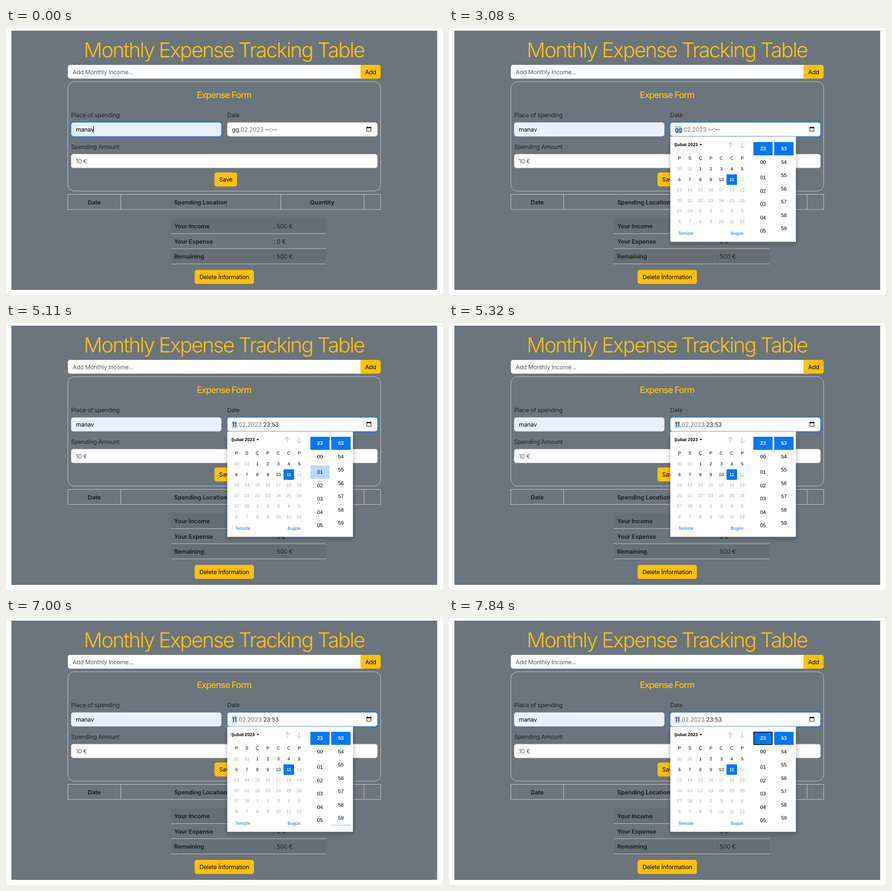
An HTML page for the animation above (8 s loop, 936x572 px).

```html
<!DOCTYPE html>
<html lang="en">
<head>
<meta charset="utf-8">
<title>Monthly Expense Tracking Table</title>
<style>
  html, body { margin: 0; width: 100%; height: 100%; overflow: hidden; background: #fff; }
  svg { display: block; }
  text { white-space: pre; font-optical-sizing: none; text-rendering: geometricPrecision; }
  .ui { font: 12.65px Inter, "Open Sans", sans-serif; letter-spacing: -.0175em; }
  .bold { font-weight: 700; letter-spacing: -.008em; }
  .title { font-size: 44.3px; font-weight: 300; letter-spacing: -.052em; }
  .sub { font-size: 19px; font-weight: 500; letter-spacing: -.055em; }
  .cal { font: 9.5px "Liberation Sans", Arial, sans-serif; }
  .time { font-size: 11px; }
  .strong { font-weight: 700; }
</style>
</head>
<body>
<svg id="stage" width="936" height="572" viewBox="0 0 936 572">
  <defs>
    <clipPath id="list"><rect x="640" y="243.7" width="102" height="201.3"/></clipPath>
    <filter id="soft" x="-10%" y="-10%" width="120%" height="120%"><feGaussianBlur stdDeviation="2"/></filter>
  </defs>
</svg>
<script>
const stage = document.getElementById('stage');
const INK = '#212529', GOLD = '#ffc107', BLUE = '#0075ff', HINT = '#595c5f', LINE = '#c6cacd';

function add(tag, attrs, parent = stage) {
  const node = document.createElementNS('http://www.w3.org/2000/svg', tag);
  for (const key in attrs) node.setAttribute(key, attrs[key]);
  parent.append(node);
  return node;
}
const group = (parent, attrs = {}) => add('g', attrs, parent);
const rect = (x, y, width, height, fill, rx = 0, parent = stage, more = {}) =>
  add('rect', { x, y, width, height, fill, rx, ...more }, parent);
const path = (d, stroke, width = 1, parent = stage) =>
  add('path', { d, stroke, 'stroke-width': width, fill: 'none' }, parent);
function label(str, x, y, cls = 'ui', fill = INK, anchor = 'start', parent = stage) {
  const node = add('text', { x, y, class: cls, fill, 'text-anchor': anchor }, parent);
  node.textContent = str;
  return node;
}
const show = (node, on) => node.setAttribute('visibility', on ? 'visible' : 'hidden');

function field(x, y, w, fill = '#fff') {
  rect(x, y, w, 29.6, fill, 4.7, stage, { stroke: '#ced4da', 'stroke-width': .8 });
}
function focusRing(x, y, w) {
  const g = group(stage);
  rect(x - 1.6, y - 1.6, w + 3.2, 32.8, 'none', 6.3, g,
    { stroke: '#0d6efd', 'stroke-opacity': .34, 'stroke-width': 3.2 });
  rect(x, y, w, 29.6, 'none', 4.7, g, { stroke: '#6ea0ee', 'stroke-width': 1 });
  return g;
}
function button(str, x, y, w) {
  rect(x, y, w, 30, GOLD, 4.7);
  label(str, x + w / 2, y + 19.5, 'ui', '#000', 'middle');
}

// Page
rect(0, 0, 936, 572, '#c4c6c8');
rect(0, 0, 936, 572, '#fff', 4);
rect(0, 5, 936, 1, '#dcdddf');
rect(11.5, 6, 912, 555, '#6c757d');
label('Monthly Expense Tracking Table', 467, 63, 'ui title', GOLD, 'middle');

rect(132.5, 79, 640, 29.5, '#fff', 4.7);
rect(759.5, 79, 43, 29.5, GOLD, 4.7);
rect(759.5, 79, 10, 29.5, GOLD);
label('Add Monthly Income...', 142.7, 98.5, 'ui', HINT);
label('Add', 781, 98.5, 'ui', '#000', 'middle');

// Form
rect(132.5, 115, 670, 234.3, 'none', 14, stage, { stroke: LINE });
label('Expense Form', 467, 150, 'ui sub', GOLD, 'middle');
label('Place of spending', 139.5, 191);
label('Date', 473.8, 191);
label('Spending Amount', 139.5, 259);
field(139.7, 202.4, 321.4, '#e8f0fe');
field(474, 202.4, 321.6);
field(139.7, 270.2, 655.9);
label('manav', 149.8, 222, 'ui', '#000');
label('10 €', 149.6, 290, 'ui', HINT);
const caret = rect(187, 209.5, 1, 15.5, '#000');
const placeRing = focusRing(139.7, 202.4, 321.4);
const dateRing = focusRing(474, 202.4, 321.6);
button('Save', 446.5, 309.5, 48.5);

function dateValue(day, dayWidth, clock, shift) {
  const g = group(stage);
  const mark = rect(483.8, 210, dayWidth, 15.2, '#a9cffc', 0, g);
  label(day, 484, 222, 'ui', INK, 'start', g);
  label('.', 499 - shift, 222, 'ui', INK, 'start', g);
  label('02.2023', 502.3 - shift, 222, 'ui', '#757575', 'start', g);
  label(clock, 554.8 - shift, 222, 'ui', INK, 'start', g);
  return { g, mark };
}
const blank = dateValue('gg', 15.2, '--:--', 0);
const filled = dateValue('11', 11, '23:53', 4);

rect(772.8, 212.5, 9, 8.8, 'none', .8, stage, { stroke: '#111', 'stroke-width': 1.1 });
rect(772.3, 212, 10, 2.7, '#111');
path('M774.6 211v2M780 211v2', '#111', 1.1);

// Expense table
rect(132.5, 356.5, 670, 32.2, 'none', 0, stage, { stroke: LINE });
path('M245.7 356.5v32M588.5 356.5v32M767 356.5v32', LINE);
[['Date', 189], ['Spending Location', 417], ['Quantity', 677.3]].forEach(([str, x]) =>
  label(str, x, 377.6, 'ui bold', INK, 'middle'));

// Totals
[['Your Income', ': 500 €'], ['Your Expense', ': 0 €'], ['Remaining', ': 500 €']].forEach(([name, sum], i) => {
  const y = 408 + i * 32.5;
  if (i !== 1) rect(353.5, y, 332.5, 32.3, 'rgba(0,0,0,.055)');
  path(`M353.5 ${y + 32.4}h332.5`, LINE);
  label(name, 360, y + 21, 'ui bold');
  label(sum, 573, y + 21);
});
button('Delete İnformation', 404, 518.3, 127);

// Date picker
const popup = group(stage);
rect(469, 236, 279.5, 231, 'rgba(0,0,0,.12)', 14, popup, { filter: 'url(#soft)' });
rect(474, 232.6, 269, 225.4, '#fff', 0, popup);
label('Şubat 2023', 482.6, 253.2, 'cal strong', '#000', 'start', popup);
add('path', { d: 'M536.3 248.4h5.8l-2.9 3.2z', fill: '#000' }, popup);
path('M602.3 257v-12.5m-5.5 5.5l5.5-5.5l5.5 5.5M628 244.5v12.5m-5.5-5.5l5.5 5.5l5.5-5.5', '#a8a8a8', .9, popup);

const STEP = 22.42;
const dayX = c => 493.6 + c * STEP;
[...'PSÇPCCP'].forEach((d, c) => label(d, dayX(c), 282.4, 'cal', '#000', 'middle', popup));
rect(594.4, 313.6, 22.6, 22.4, BLUE, 1.5, popup);
for (let i = 0; i < 42; i++) {
  const n = i - 1;
  const day = n < 1 ? n + 31 : n > 28 ? n - 28 : n;
  const chosen = n === 11;
  label(day, dayX(i % 7), 305.4 + Math.floor(i / 7) * STEP, chosen ? 'cal strong' : 'cal',
    chosen ? '#fff' : n > 0 && n < 11 ? '#000' : '#adadad', 'middle', popup);
}
const dayRing = rect(595, 314.2, 21.6, 21.4, 'none', 1.5, popup, { stroke: '#101010', 'stroke-width': 1.6 });
label('Temizle', 491, 442.5, 'cal', BLUE, 'start', popup);
label('Bugün', 630.8, 442.5, 'cal', BLUE, 'end', popup);

const ROW = 28.5;
const columns = [{ x: 652, w: 41, first: 23, wrap: 24 }, { x: 696.6, w: 41.4, first: 53, wrap: 60 }];
const rowTop = (c, i) => 244.2 + i * ROW + (c === 0 && i > 1 ? 5 : 0);
const list = group(group(popup, { 'clip-path': 'url(#list)' }));
const hover = rect(0, 0, 41, ROW, '#bad9ff', 1.5, list);
columns.forEach(({ x, w, first, wrap }, c) => {
  rect(x, rowTop(c, 0), w, ROW, BLUE, 1.5, list);
  for (let i = 0; i < 7; i++) {
    const str = String((first + i) % wrap).padStart(2, '0');
    label(str, x + w / 2, rowTop(c, i) + 18.2, i ? 'cal time' : 'cal time strong', i ? '#000' : '#fff', 'middle', list);
  }
});
const hourRing = rect(652.8, 244.6, 39.4, 26.7, 'none', 1.5, popup, { stroke: '#101010', 'stroke-width': 1.6 });

// Pointer visits: start time, column, row
const visits = [
  [0], [3570, 0, 1], [3780], [5110, 0, 2], [5180, 0, 1], [5250, 1, 1], [5320],
  [5600, 1, 5], [5670, 1, 6], [6160],
  [7000, 1, 7], [7070, 1, 5], [7140, 1, 3], [7210, 1, 2], [7280]
];

function draw(now) {
  const t = now % 8000;
  const within = (a, b) => t >= a && t < b;
  const fade = t < 350 ? 0 : Math.min(1, (Math.floor((t - 350) / 70) + 1) / 3);
  placeRing.setAttribute('opacity', 1 - fade);
  dateRing.setAttribute('opacity', fade);
  show(caret, t < 140);
  show(blank.g, t < 4620);
  show(blank.mark, within(350, 4620));
  show(filled.g, t >= 4620);
  show(filled.mark, t >= 4620);

  popup.setAttribute('display', t < 3080 ? 'none' : 'inline');
  list.setAttribute('transform', `translate(0 ${t < 4130 ? 0 : -.9})`);
  const [, col, row] = visits.findLast(v => t >= v[0]);
  show(hover, row !== undefined);
  if (row !== undefined) {
    hover.setAttribute('x', columns[col].x);
    hover.setAttribute('y', rowTop(col, row));
    hover.setAttribute('width', columns[col].w);
  }
  show(dayRing, within(6650, 7000) || within(7280, 7840));
  show(hourRing, t >= 7840);
}

const start = performance.now();
function tick() {
  draw(performance.now() - start);
  requestAnimationFrame(tick);
}
tick();
</script>
</body>
</html>
```
